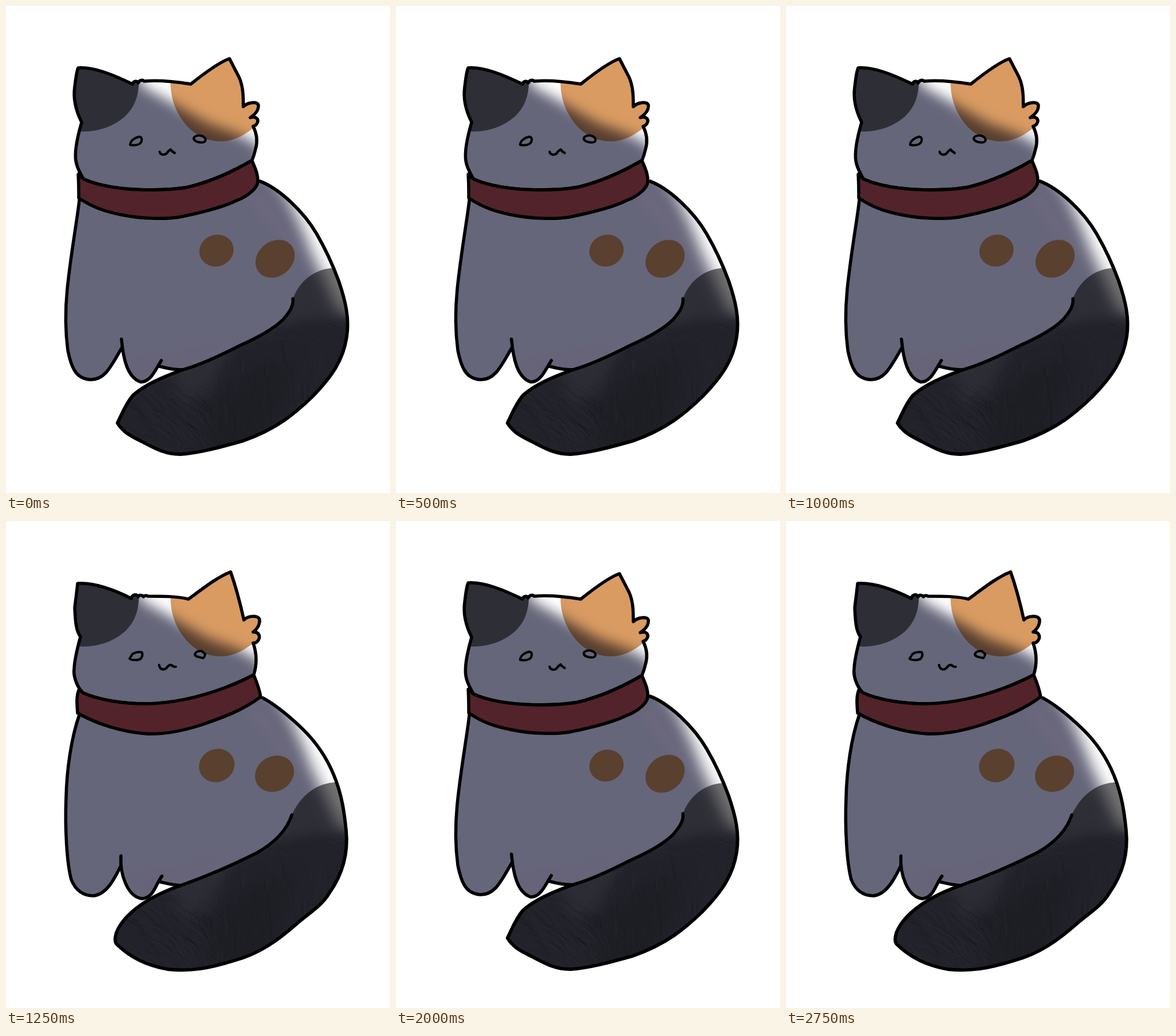
An HTML page with a canvas that plays this animation: 665x842 px, repeating every 3 s.

```html
<!DOCTYPE html>
<html lang="en">
<head>
<meta charset="utf-8">
<title>Sitting cat</title>
<style>
html, body { margin: 0; width: 100%; height: 100%; overflow: hidden; background: #fff; }
canvas { display: block; }
</style>
</head>
<body>
<canvas id="stage" width="665" height="842"></canvas>
<script>
const W = 665, H = 842, STEP = 250;
const SHADE = '#66667a';

const poses = [
  {
    head: 'M133 297C129 289 123 281 121 268C118 250 124 225 131 201C121 181 116 160 119 140C121 124 122 113 125 107C152 105 186 119 219 135C221 129 227 129 229 133C231 128 237 127 239 130C265 128 295 131 320 135C345 115 370 97 387 91C392 101 398 112 404 124C411 140 411 158 411 174C419 166 434 165 437 171C438 180 431 188 423 193C432 190 437 195 436 200C434 206 431 207 428 208C435 222 436 235 432 248C430 257 428 262 426 267',
    neck: 'M426 267C390 288 355 303 320 312C300 317 275 318 243 318C200 317 160 311 134 299',
    collar: 'M134 299L125 291C126 305 126 318 126 332C150 348 170 355 200 361C235 368 275 369 300 365C340 357 380 346 400 336C419 329 435 315 436 304C437 290 430 278 426 267',
    front: 'M127 335C124 365 112 430 106 490C102 530 103 565 107 595C113 625 121 645 147 646C172 646 182 622 200 592',
    paw: 'M200 576C203 610 210 642 233 650C250 651 258 630 269 613',
    gap: 'M266 623C280 627 293 629 306 629',
    belly: 'M497 506C498 520 490 530 480 542C462 560 430 576 405 587C370 605 335 621 306 629',
    tail: 'M306 629C270 642 240 655 220 673C207 688 201 705 193 721',
    back: 'M193 721C204 739 220 745 235 753C258 765 275 775 302 775C335 773 370 763 410 752C470 731 502 703 530 676C565 640 584 612 590 572C595 540 588 510 576 475C566 448 552 418 538 394C516 356 474 316 440 303',
    patch: 'M497 506C506 481 528 456 566 453',
    eyes: 'M215 240C215 233 224 227 231 226C237 227 236 236 230 239C225 241 219 241 215 240ZM325 229C326 224 336 222 342 226C348 230 346 236 339 236C333 236 326 234 325 229Z',
    mouth: 'M266 252C267 258 275 258 278 255C280 252 282 250 285 248C287 251 290 253 292 254',
    spots: [[364.5, 422.8, 30, 27.3, -20], [466, 437, 36.5, 30, -40]]
  },
  {
    head: 'M133 297C124 288 116 270 118 255C119 237 124 218 129 200C121 190 120 172 119 150C121 133 123 119 124 108C152 106 188 119 217 134C219 126 226 126 229 131C231 127 236 128 238 131C240 128 244 129 246 130C271 130 296 130 316 135C342 116 366 97 389 88C395 105 404 135 412 171C420 163 436 163 439 170C440 180 434 188 428 192C438 191 441 200 437 206C433 212 430 211 428 211C434 228 435 247 429 266',
    neck: 'M429 266C412 275 398 281 380 288C348 300 300 315 243 316C200 316 160 309 133 297',
    collar: 'M133 297L127 290C121 303 123 318 124 332C155 350 200 365 245 368C272 369 303 364 340 352C380 338 410 327 441 304C439 290 434 278 429 266',
    front: 'M127 335C113 375 105 430 104 480C102 530 105 590 113 620C121 640 135 648 152 648C175 645 188 618 199 596',
    paw: 'M199 579C197 610 210 650 236 653C256 651 258 630 270 614',
    gap: 'M267 624C280 627 291 630 303 630',
    belly: 'M495 508C487 533 466 556 434 574C392 595 340 617 303 630',
    tail: 'M303 630C250 648 205 677 191 712C188 722 189 728 191 731',
    back: 'M191 731C215 755 245 769 280 775C320 779 350 774 395 760C440 748 472 724 505 695C525 678 548 664 560 643C582 612 593 575 589 535C586 505 582 474 568 440C555 408 535 380 512 358C490 337 465 317 445 306',
    patch: 'M495 508C507 482 530 455 568 452',
    eyes: 'M214 238L219 230C224 227 230 226 235 227C238 231 235 237 232 239C226 241 218 241 214 238ZM327 231C328 226 334 224 339 225L345 230C344 234 343 237 341 237C336 235 329 236 327 231Z',
    mouth: 'M265 249C267 258 274 258 278 254C281 250 284 247 288 250C289 252 292 252 294 252',
    spots: [[365, 422.8, 31.3, 28.4, -25], [465, 437, 35, 30.2, -30]]
  }
];

const chain = (first, ...rest) => first + rest.map(p => 'L' + p.slice(1)).join('');

// Flips the direction of a path made of cubic curves.
function reverse(d) {
  const points = d.match(/[\d.]+ [\d.]+/g).reverse();
  return 'M' + points[0] + 'C' + points.slice(1).join(' ');
}

function seeded(seed) {
  return () => (seed = (seed * 16807) % 2147483647) / 2147483647;
}

function render(pose) {
  const canvas = document.createElement('canvas');
  canvas.width = W;
  canvas.height = H;
  const g = canvas.getContext('2d');
  g.lineCap = g.lineJoin = 'round';

  const fill = (d, color) => {
    g.fillStyle = color;
    g.fill(new Path2D(d));
  };
  const line = (d, width = 5.5, color = '#000') => {
    g.lineWidth = width;
    g.strokeStyle = color;
    g.stroke(new Path2D(d));
  };
  const soft = (d, color, blur, mode = 'source-over') => {
    g.save();
    g.filter = `blur(${blur}px)`;
    g.globalCompositeOperation = mode;
    fill(d, color);
    g.restore();
  };
  const within = (d, paint) => {
    g.save();
    g.clip(new Path2D(d));
    paint();
    g.restore();
  };

  function fur() {
    const rnd = seeded(77);
    soft('M150 842V640L310 640L400 585L470 553L530 541L640 545V842Z', '#21222a', 9);
    soft('M290 640L345 600L390 590L350 670L310 690Z', 'rgba(48,48,58,.75)', 12);
    soft('M335 842L355 690L430 630L500 610L470 700L400 842Z', 'rgba(27,27,31,.5)', 16);
    for (let i = 0; i < 300; i++) {
      const left = i % 2;
      const x = left ? 205 + rnd() * 130 : 340 + rnd() * 235;
      const y = left ? 655 + rnd() * 100 : 540 + rnd() * 215;
      const dx = left ? 22 + rnd() * 24 : y < 575 ? 22 : -4 + rnd() * 14;
      const dy = left ? 20 + rnd() * 22 : y < 575 ? 4 + rnd() * 9 : 18 + rnd() * 20;
      const tone = rnd() < .5 ? 'rgba(62,62,74,.13)' : 'rgba(16,16,22,.16)';
      line(`M${x} ${y}q${dx * .6} ${dy * .25} ${dx} ${dy}`, 1.2, tone);
    }
  }

  // Body and tail
  const body = chain(pose.front, pose.paw, pose.gap, pose.tail, pose.back) + 'Z';
  const tailArea = chain(pose.patch, 'M660 440V830H150V731', reverse(pose.tail), reverse(pose.belly)) + 'Z';

  within(body, () => {
    fill(body, '#fff');
    fill(tailArea, '#737373');
    soft('M60 250H432L488 330L511 380L529 425L553 475L576 525L630 555V842H60Z', SHADE, 13, 'multiply');
    soft('M415 325L445 325L510 420L496 430Z', 'rgba(126,108,138,.28)', 8);
    soft('M205 618L235 604L310 595L400 570L300 627L235 640Z', 'rgba(108,94,118,.3)', 8);
    within(tailArea, fur);
    for (const [x, y, rx, ry, turn] of pose.spots) {
      g.fillStyle = '#59402f';
      g.beginPath();
      g.ellipse(x, y, rx, ry, turn * Math.PI / 180, 0, 7);
      g.fill();
    }
  });
  [pose.front, pose.paw, pose.gap, pose.belly].forEach(d => line(d));
  line(chain(pose.tail, pose.back), 5.8);

  // Head
  const head = chain(pose.head, pose.neck) + 'Z';
  within(head, () => {
    fill(head, '#fff');
    fill('M285 128C284 165 298 193 320 214C338 230 362 237 385 233C407 228 421 217 434 206L470 190V70H285Z', '#d99b62');
    soft('M70 90H205L238 140L282 164L315 183L350 203L390 217L412 226L445 246V360H70Z', SHADE, 11, 'multiply');
    fill('M230 125C231 154 223 175 206 191C185 209 160 218 125 217L90 210V80H230Z', '#2e2e37');
  });
  line(head);

  // Collar
  const collar = chain(pose.neck, pose.collar) + 'Z';
  fill(collar, '#53232b');
  line(collar);

  line(pose.eyes, 4);
  line(pose.mouth, 4.2);
  return canvas;
}

const drawings = poses.map(render);
const view = document.getElementById('stage').getContext('2d');
const start = performance.now();

function draw() {
  const step = Math.floor((performance.now() - start) / STEP);
  view.fillStyle = '#fff';
  view.fillRect(0, 0, W, H);
  view.drawImage(drawings[step % drawings.length], 0, 0);
  requestAnimationFrame(draw);
}
draw();
</script>
</body>
</html>
```
